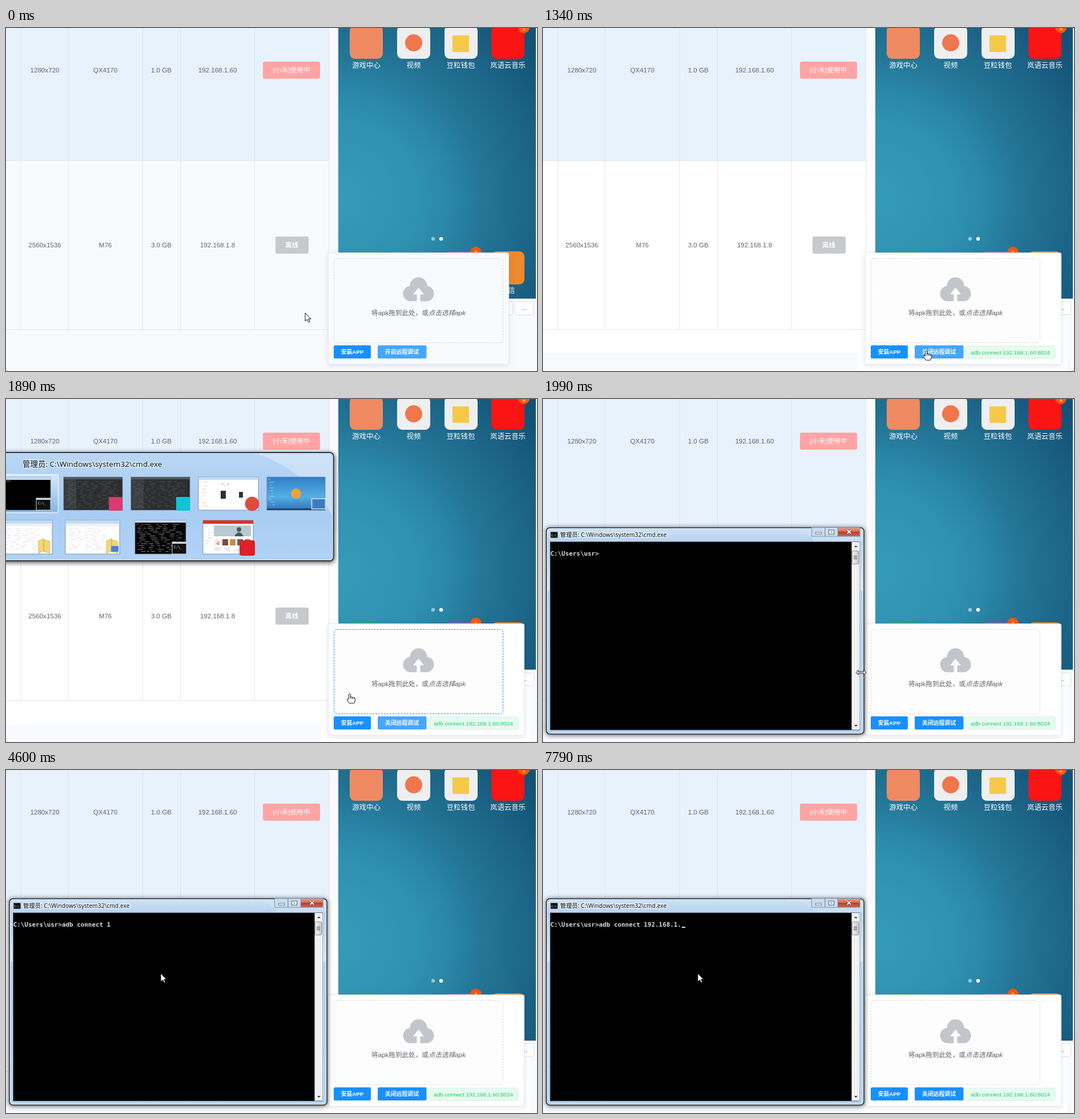
Write an HTML page that moves like this. It is 930x602 px and loops after 8 s.

```html
<!DOCTYPE html>
<html lang="zh">
<head>
<meta charset="utf-8">
<title>Remote debugging</title>
<style>
html, body { margin: 0; width: 100%; height: 100%; overflow: hidden; background: #f9fafd; }
svg { display: block; width: 930px; height: 602px; }
text { font-family: "Liberation Sans", "Noto Sans CJK SC", "Noto Sans CJK", sans-serif; white-space: pre; }
.title { font-family: "Open Sans", "Noto Sans CJK SC", "Noto Sans CJK", sans-serif; paint-order: stroke; stroke: #fff; stroke-opacity: .4; stroke-width: 4px; stroke-linejoin: round; }
.mono { font-family: "DejaVu Sans Mono", monospace; }
</style>
</head>
<body>
<svg id="stage" viewBox="0 0 930 602" xmlns="http://www.w3.org/2000/svg"></svg>
<script>
const LOOP = 8000;
const PROMPT = 'C:\\Users\\usr>';
const COMMAND = 'adb connect 192.168.1.';
const CELL = 6.56;

const rect = (x, y, w, h, fill, more = '') =>
  `<rect x="${x}" y="${y}" width="${w}" height="${h}" fill="${fill}" ${more}/>`;
const circle = (x, y, r, fill, more = '') =>
  `<circle cx="${x}" cy="${y}" r="${r}" fill="${fill}" ${more}/>`;
const path = (d, fill, more = '') => `<path d="${d}" fill="${fill}" ${more}/>`;
const text = (x, y, size, fill, str, more = '') =>
  `<text x="${x}" y="${y}" font-size="${size}" fill="${fill}" ${more}>${str}</text>`;
const mid = (x, y, size, fill, str, more = '') =>
  text(x, y, size, fill, str, 'text-anchor="middle" ' + more);
const group = (id, body, more = '') => `<g id="${id}" ${more}>${body}</g>`;
const gradient = (id, stops, more = 'x2="0" y2="1"', type = 'linear') =>
  `<${type}Gradient id="${id}" ${more}>` +
  stops.map(([o, c]) => `<stop offset="${o}" stop-color="${c}"/>`).join('') + `</${type}Gradient>`;

function randomFrom(seed) {
  return () => (seed = (seed * 16807) % 2147483647) / 2147483647;
}

// Rows of short strokes that read as tiny text
function scribble(x, y, w, h, color, seed, gap = 3, opacity = .75) {
  const rnd = randomFrom(seed);
  let d = '';
  for (let row = y; row < y + h; row += gap) {
    for (let at = x + rnd() * 8; at < x + w - 4;) {
      const len = Math.min(2 + rnd() * 9, x + w - at);
      d += `M${at.toFixed(1)} ${row}h${len.toFixed(1)}`;
      at += len + 2 + rnd() * 12;
    }
  }
  return path(d, 'none', `stroke="${color}" stroke-width=".8" opacity="${opacity}"`);
}

const defs = '<defs>' +
  gradient('wall', [[0, '#359bb8'], [.33, '#2f91b1'], [.45, '#2a86a6'], [.58, '#247697'], [.76, '#1d6789'], [1, '#145177']],
    'gradientUnits="userSpaceOnUse" cx="585" cy="300" r="430"', 'radial') +
  gradient('glass', [[0, '#cfe2f4'], [.07, '#b4d3f0'], [.3, '#d5e6f5'], [.31, '#b3d3f0'], [1, '#b7d6f2']]) +
  gradient('switcher', [[0, '#b9d7f6'], [.5, '#a8ccf2'], [1, '#b0d2f5']]) +
  gradient('close', [[0, '#e2a594'], [.45, '#d0705b'], [.5, '#bd3b22'], [1, '#d0684c']]) +
  gradient('pick', [[0, '#d6e9fb'], [1, '#86b5e2']]) +
  gradient('desk', [[0, '#2f7fc6'], [.6, '#55aee6'], [1, '#2f74b8']]) +
  gradient('knob', [[0, '#f5f5f5'], [1, '#c4c4c6']], '') +
  '</defs>';

function table() {
  const line = (d, c) => path(d, 'none', `stroke="${c}"`);
  const columns = [26.5, 109, 239.5, 305.5, 435.5];
  const verticals = (y, h) => [...columns, 565.5].map(x => `M${x} ${y}v${h}`).join('');
  const cell = (x, y, s) => mid(x, y, 11.6, '#606266', s);
  const row = (y, values) => values.map((s, i) => cell([68, 174, 272, 370.5][i], y, s)).join('');
  return rect(0, 0, 566, 233, '#e7f2fd') +
    line(verticals(0, 233) + 'M0 232.5h566', '#d8e4f0') +
    line(verticals(233, 297) + 'M0 529.5h566', '#e3e7f1') +
    row(78, ['1280x720', 'QX4170', '1.0 GB', '192.168.1.60']) +
    row(385, ['2560x1536', 'M76', '3.0 GB', '192.168.1.8']) +
    rect(450, 59, 100, 30, '#ffa4a4', 'rx="3"') + mid(500, 78, 11.7, '#fff', '[小禾]使用中') +
    rect(472, 366, 58, 30, '#c8c9cc', 'rx="3"') + mid(500.5, 385, 11.5, '#fff', '离线', 'font-weight="700"');
}

function phone() {
  const tile = (x, y, fill) => rect(x, y, 58, 58, fill, 'rx="9"');
  const label = (x, y, s) => mid(x, y, 12.4, '#fff', s);
  const badge = (x, y) => circle(x, y, 10, '#ff560c') + mid(x, y + 5, 11, '#fff', '1');
  return rect(582, 0, 346, 475, 'url(#wall)') +
    tile(602, -4, '#ef8a62') +
    tile(685, -4, '#efeff0') + circle(714, 26, 15, '#f0764c') +
    tile(768, -4, '#efeff0') + rect(782, 13, 29, 29, '#f7c948') +
    tile(850, -4, '#fa1414') +
    badge(907, -1) +
    label(631, 69.5, '游戏中心') + label(714, 69.5, '视频') +
    label(796.5, 69.5, '豆粒钱包') + label(879, 69.5, '岚语云音乐') +
    circle(748, 370, 3.2, '#fff', 'opacity=".5"') + circle(762, 370, 3.2, '#fff') +
    tile(602, 392, '#2fa66a') + tile(685, 392, '#2b8fc0') + tile(768, 392, '#8b5fc4') + tile(850, 392, '#f08a2c') +
    badge(823, 394) + label(879, 464.5, '短信') +
    rect(854.5, 480.5, 33, 23, '#fff', 'rx="2" stroke="#dcdfe6"') +
    rect(891.5, 480.5, 33, 23, '#fff', 'rx="2" stroke="#dcdfe6"') + mid(908, 495, 11, '#606266', '...');
}

function panel() {
  const cloud = 'M708 479.5A13.4 13.4 0 0 1 707.4 452.8A15.1 15.3 0 0 1 737.6 452.8A13.4 13.4 0 0 1 737 479.5' +
    'H725.5V467.5H732L722.5 455.5L713 467.5H719.5V479.5Z';
  return rect(564.5, 394.5, 316, 195.5, '#fbfbfd',
      'id="card" rx="3" stroke="#e6eaf2" style="filter:drop-shadow(0 2px 5px rgba(40,60,110,.13))"') +
    rect(574.5, 404.5, 296, 148, '#fdfdfe', 'id="drop" rx="5" stroke-dasharray="3 2"') +
    path(cloud, '#c2c5cc') +
    text(640, 504, 11.6, '#606266', '将apk拖到此处，或<tspan font-style="italic">点击选择apk</tspan>') +
    rect(574, 557, 65, 23, '#1890ff', 'rx="2"') + mid(606.5, 572.3, 9.8, '#fff', '安装APP', 'font-weight="700"') +
    rect(651, 557, 85.5, 23, '#46a6ff', 'id="remote" rx="2"') +
    mid(693.5, 572.3, 9.9, '#fff', '', 'id="remoteLabel" font-weight="700"') +
    group('tag', rect(740.5, 558, 156.5, 22, '#e7faf0', 'rx="3" stroke="#cdf4de"') +
      mid(818.5, 572.5, 9.9, '#13ce66', 'adb connect 192.168.1.60:8024'));
}

function switcher() {
  const thumb = (x, y, w, h, fill) => rect(x, y, w, h, fill, 'stroke="#5d7fa5" stroke-width=".8"');
  const folder = (x, y) => path(`M${x} ${y}l9-4v21l-9 5zM${x + 9} ${y - 2}l11 3v20l-11-2z`, '#f3d777', 'stroke="#c9a53e" stroke-width=".7"');
  const shell = (x, y) => rect(x, y, 25, 21, '#111', 'stroke="#ddd"') + rect(x, y, 25, 3, '#ccd6e2') +
    text(x + 3, y + 11, 6, '#fff', 'C:\\_', 'class="mono"');
  const explorer = (x, w, seed) => thumb(x, 213, w, 59, '#fff') + rect(x, 213, w, 6, '#c3dcf3') +
    rect(x, 220, w, 3, '#e6eef8') + scribble(x + 4, 227, w - 26, 38, '#9ba8bd', seed, 4, .5);
  const title = '管理员: C:\\Windows\\system32\\cmd.exe';
  return rect(-20, 94, 593.5, 190, 'url(#switcher)',
      'rx="6" stroke="#2b343e" stroke-width="2" style="filter:drop-shadow(1px 2px 4px rgba(0,0,0,.7))"') +
    path('M440 96H566Q571 96 571 102V205Q536 132 440 96Z', '#dcecfa', 'opacity=".6"') +
    rect(-20, 95.5, 592, 187, 'none', 'rx="5" stroke="#e3f0fc"') +
    text(29, 118.5, 13.5, '#101418', title, 'class="title"') +
    rect(-8, 132.5, 99.5, 67, 'url(#pick)', 'rx="3" stroke="#eaf5ff" stroke-width="1.4"') +
    thumb(-6, 137, 84, 58, '#000') + rect(-6, 137, 84, 5, '#c2dbf2') + scribble(0, 144, 20, 3, '#ddd', 5) + shell(53, 174) +
    [[101, 21], [219, 34]].map(([x, seed]) => thumb(x, 137, 103, 58, '#2b2d30') +
      rect(x, 137, 103, 4, '#54585c') + rect(x, 141, 22, 52, '#3a3d40') +
      scribble(x + 3, 145, 94, 46, '#8c9689', seed, 3, .4)).join('') +
    rect(180, 172, 24, 24, '#d83b70') + rect(298, 172, 24, 24, '#12c3d6') +
    thumb(337, 137, 105, 58, '#fff') + rect(337, 137, 105, 5, '#c4dcf4') + scribble(341, 146, 12, 44, '#a6acb5', 8, 6) +
    rect(376, 161, 9, 14, '#263442') + rect(408, 163, 7, 10, '#263442') + scribble(376, 149, 22, 4, '#777', 3) +
    circle(431, 184, 12.5, '#e14b3c') +
    thumb(457, 137, 102, 58, 'url(#desk)') + circle(508, 166, 9, '#e8a33c') +
    scribble(459, 141, 12, 48, '#d8e6f4', 9, 5) + rect(457, 192, 102, 3, '#22456d') +
    rect(535.5, 175, 24, 18, '#3d7cc5', 'stroke="#e0e6ec" stroke-width="1.5"') +
    explorer(-10, 91, 12) + explorer(104, 95, 45) + folder(57, 249) + folder(176, 249) + rect(184, 258, 13, 10, '#4388cf') +
    thumb(226, 213, 89, 59, '#050505') + rect(226, 213, 89, 4, '#c2dbf2') +
    scribble(229, 220, 80, 50, '#e0e0e0', 77, 3.4) + shell(291, 251) +
    thumb(345, 213, 88, 59, '#fff') + rect(345, 213, 88, 6, '#d63431') + scribble(347, 224, 14, 42, '#aaa', 19, 5) +
    rect(364, 222, 65, 19, '#b9c9d2') + circle(408, 229, 4, '#475664') + path('M400 241q8-14 16 0z', '#475664') +
    ['#f2e9e6', '#7a4d3f', '#c98c45', '#5b6470', '#9c7b6d'].map((c, i) => rect(366 + 13 * i, 246, 10, 11, c)).join('') +
    mid(371, 256, 9, '#d63431', '4') + scribble(365, 262, 62, 6, '#9a8f8c', 15) +
    rect(409, 248, 27, 27, '#e01f26', 'rx="4"');
}

function terminal() {
  const button = (x, w, fill) => rect(x, 225.5, w, 15.5, fill, 'stroke="#7388a0" stroke-width=".9"');
  return rect(6, 226, 556, 362, 'url(#glass)',
      'rx="6" stroke="#1c2228" stroke-width="1.6" style="filter:drop-shadow(0 1px 4px rgba(0,0,0,.7))"') +
    path('M440 227H556Q561 227 561 232V250H475Q466 234 440 227Z', '#d4e6f7', 'opacity=".55"') +
    rect(7.3, 227.3, 553.4, 359.4, 'none', 'rx="5" stroke="#e6f2fc"') +
    rect(13, 233, 13, 11, '#111', 'stroke="#cfd6dd" stroke-width=".8"') + text(14.5, 241, 5, '#fff', 'C:\\', 'class="mono"') +
    text(30, 241.7, 10.3, '#101010', '管理员: C:\\Windows\\system32\\cmd.exe', 'class="title"') +
    button(470.5, 23.5, '#c8dcef') + button(494, 22.5, '#c8dcef') + button(516.5, 38.5, 'url(#close)') +
    rect(477.5, 234, 10, 3, '#fff', 'stroke="#4a5868" stroke-width=".8"') +
    rect(500.5, 230, 9, 7, '#fff', 'stroke="#4a5868"') + rect(503.5, 232.5, 3, 2, '#7b8a99') +
    path('M533 230l6 6m0-6l-6 6', 'none', 'stroke="#5a3a36" stroke-width="3.6"') +
    path('M533 230l6 6m0-6l-6 6', 'none', 'stroke="#fff" stroke-width="2"') +
    rect(12.5, 250.5, 542, 330.5, '#000', 'stroke="#64798e" stroke-width=".8"') +
    rect(540.5, 251, 14, 329.5, '#f1f1f2') +
    path('M545 260l3-3 3 3zM545 572l3 3 3-3z', '#333') +
    rect(541.5, 266.5, 11.5, 23, 'url(#knob)', 'rx="1.5" stroke="#94969a"') +
    path('M544 275.5h6m-6 2.5h6m-6 2.5h6', 'none', 'stroke="#555"') +
    text(12.7, 275, 10.9, '#dcdcdc', '', 'id="typed" class="mono" font-weight="700"') +
    rect(0, 275, 6.4, 2, '#dcdcdc', 'id="caret"');
}

const ink = 'stroke="#111" stroke-width="1" stroke-linejoin="round"';
const pointers =
  path('M0 0V14.5L3.5 11.4L6 16.4L8.2 15.4L5.8 10.5H10Z', '#fff', `id="arrow" ${ink}`) +
  path('M-1.6 10V1.3Q0-.8 1.6 1.3V6.2Q3.2 5 4.6 6.6Q6.2 5.8 7.4 7.4Q9.2 7 9.4 9V12L7.6 17H-.6L-5 10.5Q-4.4 8.4-1.6 10ZM1.6 6.2V9.5M4.6 6.6V9.5M7.4 7.4V9.5', '#fff', `id="hand" ${ink}`) +
  path('M-9 0L-4.5-4V-1.2H4.5V-4L9 0L4.5 4V1.2H-4.5V4Z', '#fff', `id="resize" ${ink}`);

const stage = document.getElementById('stage');
stage.innerHTML = defs + rect(0, 0, 930, 602, '#f9fafd') +
  group('white', rect(0, 233, 582, 337, '#fff')) +
  group('gutter', rect(552, 475, 366, 127, '#fff')) +
  table() + phone() + panel() +
  group('switch', switcher()) + group('cmd', terminal()) + group('pointer', pointers);

const el = {};
stage.querySelectorAll('[id]').forEach(node => el[node.id] = node);
const show = (node, on) => node.setAttribute('display', on ? 'inline' : 'none');

// Moments at which the pointer is redrawn
const ticks = [0, ...Array.from({ length: 11 }, (_, i) => 70 + 80 * i),
  1170, 1270, 1370, 1470, 1560, 1640, 1710, 1790, 1890, 1990, 2060, 2170,
  2280, 2350, 2420, 2480, 2560, 2650];
const route = [[0, 524, 500], [870, 671, 566], [1560, 671, 566], [1790, 643, 550], [1890, 602, 517],
  [1990, 557, 480], [2170, 374, 375], [2650, 271, 357]];
const keyTimes = [...Array.from({ length: 9 }, (_, i) => 3030 + 127.5 * i),
  4200, 4320, 4450, 4450, 4750, 5150, 5440, 6080, 6680, 6880, 7050, 7630, 7790];
const caretOff = [[0, 2480], [4600, 4750], [5670, 6080], [6220, 6680], [6750, 6880], [7250, 7630]];

function pointerAt(time) {
  const t = ticks.filter(v => v <= time).pop();
  const next = route.findIndex(k => k[0] > t);
  if (next < 0) return route[route.length - 1].slice(1);
  const [t0, x0, y0] = route[next - 1], [t1, x1, y1] = route[next];
  const p = (t - t0) / (t1 - t0), e = p * p * (3 - 2 * p);
  return [x0 + (x1 - x0) * e, y0 + (y1 - y0) * e];
}

function draw(t) {
  const [x, y] = pointerAt(t);
  const inside = (l, top, r, b) => x >= l && x <= r && y >= top && y <= b;
  const debugging = t >= 1170, console = t >= 1990;
  const overDrop = !console && inside(574, 404, 871, 553);
  const overButton = !console && (inside(574, 557, 639, 580) || inside(651, 557, 737, 580));
  const resizing = console && t < 2060;

  show(el.white, t >= 470);
  show(el.gutter, debugging);
  el.card.setAttribute('width', debugging ? 343 : 316);
  el.card.setAttribute('fill', t < 470 ? '#f9fafd' : debugging ? '#fff' : '#fbfbfd');
  el.drop.setAttribute('fill', t < 470 ? '#f9fafd' : '#fdfdfe');
  el.drop.setAttribute('stroke', overDrop ? '#1890ff' : '#d9dbe0');
  el.remote.setAttribute('fill', console ? '#1890ff' : '#46a6ff');
  el.remoteLabel.textContent = debugging ? '关闭远程调试' : '开启远程调试';
  show(el.tag, debugging);
  show(el.switch, t >= 1890 && !console);
  show(el.cmd, console);

  const count = keyTimes.filter(k => k <= t).length;
  el.typed.textContent = PROMPT + COMMAND.slice(0, count);
  el.caret.setAttribute('x', 13.4 + (PROMPT.length + count) * CELL);
  show(el.caret, !caretOff.some(([from, to]) => t >= from && t < to));

  el.pointer.setAttribute('transform', `translate(${x.toFixed(1)} ${y.toFixed(1)})`);
  show(el.hand, overDrop || overButton);
  show(el.resize, resizing);
  show(el.arrow, !overDrop && !overButton && !resizing);
}

const start = performance.now();
function frame() {
  draw((performance.now() - start) % LOOP);
  requestAnimationFrame(frame);
}
frame();
</script>
</body>
</html>
```
